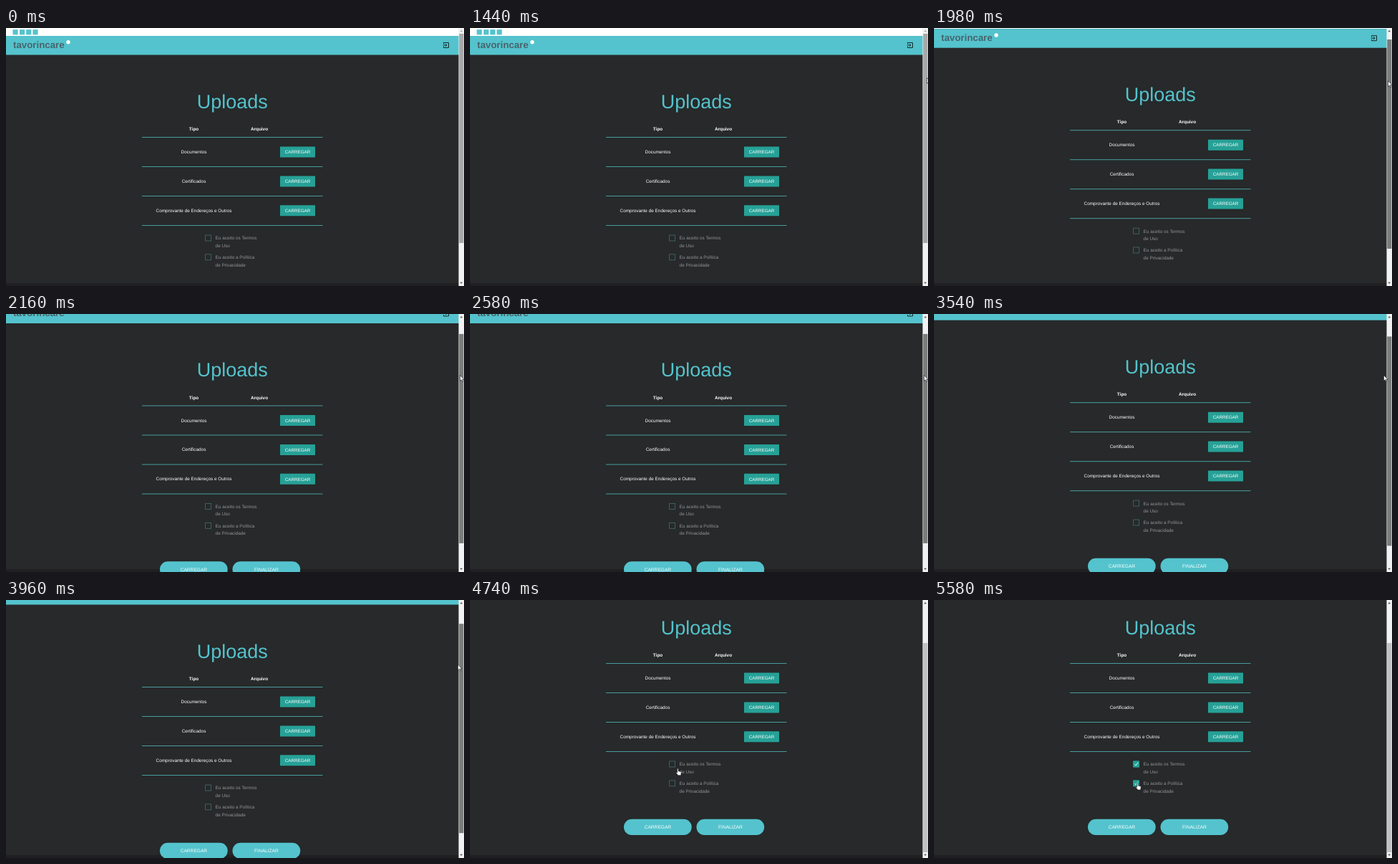
An HTML page that plays this animation: 640 by 360 pixels, repeating every 5640 ms.

```html
<!DOCTYPE html>
<html lang="pt">
<head>
<meta charset="utf-8">
<title>Uploads</title>
<style>
html, body { margin: 0; width: 100%; height: 100%; overflow: hidden; background: #27292a; }
svg { display: block; width: 640px; height: 360px; }
text { font-family: "Liberation Sans", Arial, sans-serif; font-size: 6.4px; fill: #fff; text-rendering: geometricPrecision; }
.mid { text-anchor: middle; }
.bold { font-weight: 700; }
.title { font-size: 27px; fill: #54c3cd; }
.brand { font-size: 13.3px; font-weight: 700; fill: #47656e; }
.terms { fill: #949596; }
.pill { font-size: 6.6px; }
</style>
</head>
<body>
<svg viewBox="0 0 640 360">
  <rect width="640" height="360" fill="#27292a"/>
  <rect y="356" width="633" height="4" fill="#201f21"/>
  <g id="page">
    <rect width="633" height="11" fill="#fff"/>
    <rect y="11" width="633" height="26.5" fill="#54c3cd"/>
    <g id="social" fill="#54c3cd"></g>
    <text class="brand" x="10" y="27.6">tavorincare</text>
    <circle cx="87" cy="19.8" r="2.7" fill="#fff"/>
    <g fill="none" stroke="#15282b" stroke-width="1">
      <path d="M611.5 22.4V20.5H618.5V27.5H611.5V25.6"/>
      <path d="M610.8 24H616M614.3 22.2 616.1 24 614.3 25.8"/>
    </g>
    <text class="title mid" x="316.3" y="111.6">Uploads</text>
    <text class="bold mid" x="262.5" y="143">Tipo</text>
    <text class="bold mid" x="354" y="143">Arquivo</text>
    <g id="table"></g>
    <g id="terms"></g>
    <g id="pills"></g>
  </g>
  <rect x="632.5" width="7.5" height="360" fill="#f1f1f1"/>
  <path id="up" d="M634.3 5.2 636.2 3 638.1 5.2Z"/>
  <path d="M634.3 354.8 636.2 357 638.1 354.8Z" fill="#505050"/>
  <rect id="thumb" x="633.2" width="6.2" height="292"/>
  <g fill="#fff" stroke="#111" stroke-width=".6" stroke-linejoin="round">
    <path id="arrow" d="M0 0V8l1.9-1.8 1.3 3 1.3-.6-1.3-2.7H5.6Z"/>
    <path id="hand" d="M-.7.8C-.7-.3.9-.3.9.8V3.8l3 .6c.9.2 1.1.7 1 1.5L4.4 9.7H.6L-2.1 6.4c-.5-.7.4-1.3 1-.7l.4.4Z"/>
  </g>
</svg>
<script>
const LOOP = 5640, STEP = 60;
const $ = id => document.getElementById(id);

// [time, scroll offset]
const scrollKeys = [[1860, 0], [2160, 24.5], [2700, 24.5], [3180, 27], [3960, 31], [4500, 64]];
// [time, x, y] of the pointer tip
const pointerKeys = [
  [1440, 638.5, 69.5], [1620, 634.5, 66], [1860, 634.5, 66], [2160, 634.5, 85.5],
  [2700, 634.5, 85.5], [3180, 626, 81.5], [3960, 631.5, 90], [4500, 632, 117],
  [4560, 620, 124], [4740, 290.3, 235], [4860, 284, 229], [5040, 284, 229],
  [5280, 284.3, 255.3]
];
const SHOW = 1440, DRAG = 1800, RELEASE = 4560, HAND = 4740;
const checkTimes = [4920, 5400];

function sample(keys, t) {
  const next = keys.findIndex(k => k[0] > t);
  if (next < 0) return keys.at(-1).slice(1);
  if (next === 0) return keys[0].slice(1);
  const a = keys[next - 1], b = keys[next], p = (t - a[0]) / (b[0] - a[0]);
  return a.slice(1).map((v, i) => v + (b[i + 1] - v) * p);
}

$("social").innerHTML = [9.5, 19, 28.2, 37.4]
  .map(x => `<rect x="${x}" y="2.2" width="7.2" height="7.2"/>`).join("");

const rule = y => `<rect x="190" y="${y}" width="252.5" height="1" fill="#489c9d"/>`;
$("table").innerHTML = rule(152) + ["Documentos", "Certificados", "Comprovante de Endereços e Outros"]
  .map((label, i) => {
    const y = 173 + i * 40.9;
    return `<text class="mid" x="262.5" y="${y + 2}">${label}</text>
      <rect x="383" y="${y - 7.5}" width="49" height="15" rx=".6" fill="#26a197"/>
      <text class="mid" x="407.5" y="${y + 2.2}" style="font-size:6.3px">CARREGAR</text>
      ${rule(Math.round(193 + i * 41))}`;
  }).join("");

$("terms").innerHTML = [["Eu aceito os Termos", "de Uso"], ["Eu aceito a Política", "de Privacidade"]]
  .map(([first, second], i) => {
    const y = 293 + i * 26.8;
    return `<rect x="278.6" y="${y - 4}" width="8" height="8" fill="none" stroke="#456b6c" stroke-width=".8"/>
      <g class="check"><rect x="278.2" y="${y - 4.4}" width="8.8" height="8.8" rx=".8" fill="#26a197"/>
      <path d="M280.5 ${y + .3}l1.5 1.7 3-4" fill="none" stroke="#fff" stroke-width=".9"/></g>
      <text class="terms" x="292.6" y="${y + 2.4}">${first}</text>
      <text class="terms" x="292.6" y="${y + 12.9}">${second}</text>`;
  }).join("");

$("pills").innerHTML = [[215, "CARREGAR"], [316.5, "FINALIZAR"]]
  .map(([x, label]) => `<rect x="${x}" y="369.7" width="94.7" height="22.3" rx="11.1" fill="#54c3cd"/>
    <text class="mid pill" x="${x + 47.4}" y="383.3">${label}</text>`).join("");

const checks = document.querySelectorAll(".check");
const show = (el, on) => el.setAttribute("visibility", on ? "visible" : "hidden");

function draw(now) {
  const t = Math.floor((now % LOOP) / STEP) * STEP;
  const [scroll] = sample(scrollKeys, t);
  const place = `translate(${sample(pointerKeys, t)})`;
  $("page").setAttribute("transform", `translate(0 ${-scroll})`);
  $("thumb").setAttribute("y", 8 + scroll * 0.8125);
  $("thumb").setAttribute("fill", t < DRAG ? "#a8a8a8" : t < RELEASE ? "#7b7b7b" : "#c1c1c1");
  $("up").setAttribute("fill", scroll > 0 ? "#505050" : "#a3a3a3");
  $("arrow").setAttribute("transform", place);
  $("hand").setAttribute("transform", place);
  show($("arrow"), t >= SHOW && t < HAND);
  show($("hand"), t >= HAND);
  checks.forEach((el, i) => show(el, t >= checkTimes[i]));
}

const start = performance.now();
(function tick() {
  draw(performance.now() - start);
  requestAnimationFrame(tick);
})();
</script>
</body>
</html>
```
